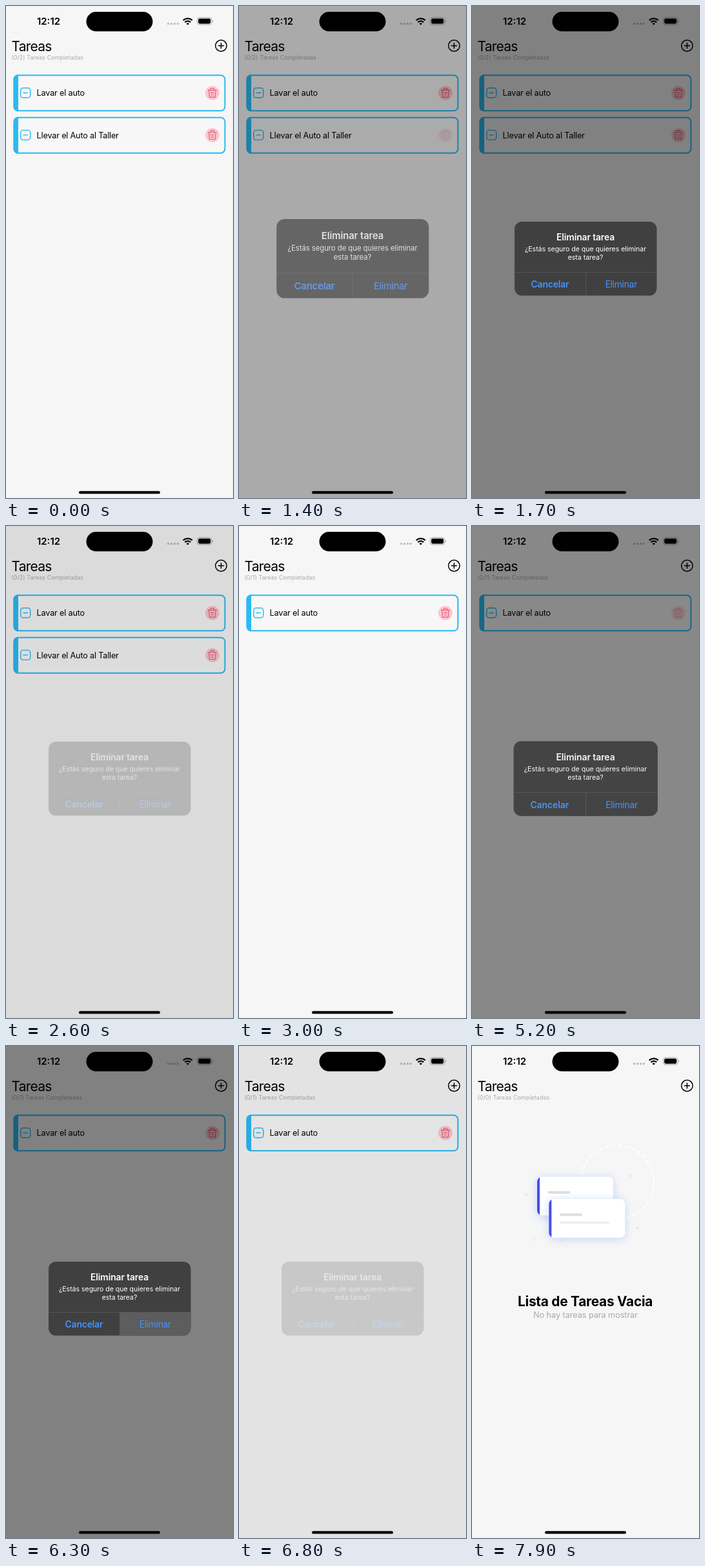
Animation, 352 px wide and 762 px high, one loop 8 s. Source, as an HTML page:

```html
<!DOCTYPE html>
<html lang="es">
<head>
<meta charset="utf-8">
<title>Tareas</title>
<style>
  html, body { margin: 0; width: 100%; height: 100%; overflow: hidden; background: #f6f6f6; }
  svg { display: block; width: 100%; height: 100%; }
  text { font-family: Inter, "Noto Sans", sans-serif; font-optical-sizing: none; white-space: pre; }
  .mid { text-anchor: middle; }
  .line { fill: none; stroke-linecap: round; stroke-linejoin: round; }
  .task { font-size: 12.7px; letter-spacing: -.2px; }
  .gray { fill: #a9a9a9; }
  .button { font-size: 13.8px; fill: #4593ff; }
  .soft { filter: drop-shadow(0 2px 7px rgba(130, 175, 245, .45)); }
</style>
</head>
<body>
<svg viewBox="0 0 352 762">
  <defs>
    <g id="card">
      <rect x="1" y="1" width="327" height="55" rx="6.5" fill="#f7f7f7" stroke="#2abaf2" stroke-width="2"/>
      <path d="M7.5 0A7.5 7 0 0 0 0 7V50A7.5 7 0 0 0 7.5 57Z" fill="#2abaf2"/>
      <g class="line" stroke="#2abaf2" stroke-width="1.4">
        <rect x="11.2" y="20.7" width="15" height="15" rx="3.8"/>
        <path d="M15.5 28.2h6.4"/>
      </g>
    </g>
    <g id="trash">
      <circle r="10.9" fill="#fbc6cf"/>
      <path class="line" stroke="#e05f78" stroke-width="1.15"
        d="M-6.5 -4.4H6.5M-3 -4.4L-2.3 -7.2H2.3L3 -4.4M-5.3 -4.4L-4.5 6.4H4.5L5.3 -4.4M-2.6 -.4H2.6M-1.7 3H1.7"/>
    </g>
    <g id="note">
      <rect class="soft" width="118" height="60" rx="8" fill="#fff"/>
      <path d="M4 1.1A8 8 0 0 0 0 8V52A8 8 0 0 0 4 58.9Z" fill="#4a4bea"/>
      <path class="line" d="M18.5 24.3h31" stroke="#dedede" stroke-width="4"/>
    </g>
  </defs>

  <rect width="352" height="762" fill="#f6f6f6"/>

  <!-- Status bar -->
  <text class="mid" x="66" y="29" font-size="15" font-weight="600">12:12</text>
  <g fill="#bcbcbc">
    <circle cx="251.6" cy="27.5" r="1.7"/><circle cx="256.6" cy="27.5" r="1.7"/>
    <circle cx="261.6" cy="27.5" r="1.7"/><circle cx="266.4" cy="27.5" r="1.7"/>
  </g>
  <g fill="none" stroke="#000" stroke-width="2.3">
    <path d="M274.8 22.2a10.2 10.2 0 0 1 14 0M277.4 25.2a6.4 6.4 0 0 1 8.8 0"/>
    <path d="M281.8 29.6l-2.2-2.3a3.2 3.2 0 0 1 4.4 0z" fill="#000" stroke="none"/>
  </g>
  <rect x="296.5" y="18" width="22.4" height="11" rx="3.6" fill="none" stroke="#a5a5a5"/>
  <rect x="298.1" y="19.6" width="19.2" height="7.8" rx="2.3"/>
  <path d="M320.2 21.7a2 2 0 0 1 0 3.6z" fill="#a5a5a5"/>

  <!-- Header -->
  <text x="8.5" y="70" font-size="21" letter-spacing="-.75">Tareas</text>
  <text id="count" class="gray" x="8.5" y="83.3" font-size="8.8" letter-spacing=".14"></text>
  <g class="line" stroke="#000" stroke-width="1.5">
    <circle cx="333.5" cy="61.5" r="8.7"/>
    <path d="M329.5 61.5h8M333.5 57.5v8"/>
  </g>

  <g id="task1">
    <use href="#card" x="11.5" y="106.3"/>
    <text class="task" x="47.6" y="139.3">Lavar el auto</text>
    <use id="trash1" href="#trash" x="320" y="134.7"/>
  </g>
  <g id="task2">
    <use href="#card" x="11.5" y="171.7"/>
    <text class="task" x="47.6" y="204.7">Llevar el Auto al Taller</text>
    <use id="trash2" href="#trash" x="320" y="200.1"/>
  </g>

  <g id="empty">
    <circle cx="225" cy="211" r="57" fill="none" stroke="#fff" stroke-width="2" stroke-dasharray="6 4"/>
    <g fill="#e3e9f4">
      <circle cx="84" cy="230" r="2.3"/><circle cx="246" cy="201" r="2"/>
      <circle cx="256.5" cy="282" r="2.3"/><circle cx="96" cy="300" r="1.8"/>
      <circle cx="140" cy="301" r="1.8"/>
    </g>
    <use href="#note" x="101" y="202.5"/>
    <use href="#note" x="119.3" y="237"/>
    <path class="line" d="M137.5 273.6h74" stroke="#efefef" stroke-width="4"/>
    <text class="mid" x="175.6" y="403.3" font-size="20.8" font-weight="700" letter-spacing="-.24">Lista de Tareas Vacia</text>
    <text class="mid gray" x="176" y="421.3" font-size="12.7" letter-spacing="-.06">No hay tareas para mostrar</text>
  </g>

  <rect x="113" y="751.2" width="126" height="4.4" rx="2.2"/>
  <rect id="shade" width="352" height="762"/>

  <g id="dialog">
    <rect x="66" y="334" width="220.5" height="114.5" rx="11.5" fill="#404040"/>
    <path id="pressed" d="M176.5 412.5h110V437a11.5 11.5 0 0 1-11.5 11.5h-98.5z" fill="#5d5d5d"/>
    <path d="M66 412.4H286.5M176.3 412.4V448.5" stroke="#5c5c5c" stroke-width=".8"/>
    <g class="mid" fill="#fff">
      <text x="176" y="363.2" font-size="13.8" font-weight="600" letter-spacing="-.08">Eliminar tarea</text>
      <g font-size="10.6" letter-spacing="-.05">
        <text x="176" y="380">¿Estás seguro de que quieres eliminar</text>
        <text x="176" y="393">esta tarea?</text>
      </g>
    </g>
    <text class="button mid" x="121" y="436" font-weight="600" letter-spacing="-.1">Cancelar</text>
    <text class="button mid" x="231.3" y="436" letter-spacing="-.3">Eliminar</text>
  </g>

  <rect x="124.5" y="9" width="103" height="30.2" rx="15.1"/>
</svg>

<script>
const LOOP = 8000, STEP = 100;
const SHADE = 0.48, PRESSED_OPACITY = 0.28;

// Each confirmation, in ms: trash touched, dialog opens, button pressed, dialog closes.
const rounds = [
  { touch: 1200, open: 1300, press: 2400, close: 2473, trash: 'trash1' },
  { touch: 4900, open: 5000, press: 6300, close: 6651, trash: 'trash1' }
];
rounds[0].trash = 'trash2';
const REMOVE_SECOND = 3000, REMOVE_FIRST = 7400;

const el = id => document.getElementById(id);
const clamp = v => Math.min(1, Math.max(0, v));
const opacity = (id, v) => el(id).setAttribute('opacity', v);
const show = (id, on) => el(id).setAttribute('visibility', on ? 'visible' : 'hidden');

// Critically damped spring from 0 to 1.
function spring(ms) {
  const x = Math.max(0, ms) * 0.022;
  return 1 - (1 + x) * Math.exp(-x);
}

function trashOpacity(t, { touch }) {
  if (t < touch) return 1;
  return PRESSED_OPACITY + (1 - PRESSED_OPACITY) * clamp((t - touch - 200) / 250);
}

function render(t) {
  const round = t < 4000 ? rounds[0] : rounds[1];
  const opened = spring(t - round.open);
  const visible = opened * (1 - spring(t - round.close));
  const scale = 1 + 0.2 * (1 - opened);

  opacity('shade', SHADE * visible);
  opacity('dialog', visible);
  el('dialog').setAttribute('transform',
    `translate(176 391) scale(${scale}) translate(-176 -391)`);
  show('pressed', t >= round.press && t < round.close);

  opacity('trash1', 1);
  opacity('trash2', 1);
  opacity(round.trash, trashOpacity(t, round));

  const total = t < REMOVE_SECOND ? 2 : t < REMOVE_FIRST ? 1 : 0;
  el('count').textContent = `(0/${total}) Tareas Completadas`;
  show('task1', total > 0);
  show('task2', total > 1);

  const fade = clamp((t - REMOVE_FIRST + 50) / 500);
  opacity('empty', total ? 0 : fade * fade * (3 - 2 * fade));
}

const start = performance.now();
function tick() {
  const t = (performance.now() - start) % LOOP;
  render(Math.floor(t / STEP) * STEP);
  requestAnimationFrame(tick);
}
tick();
</script>
</body>
</html>
```
